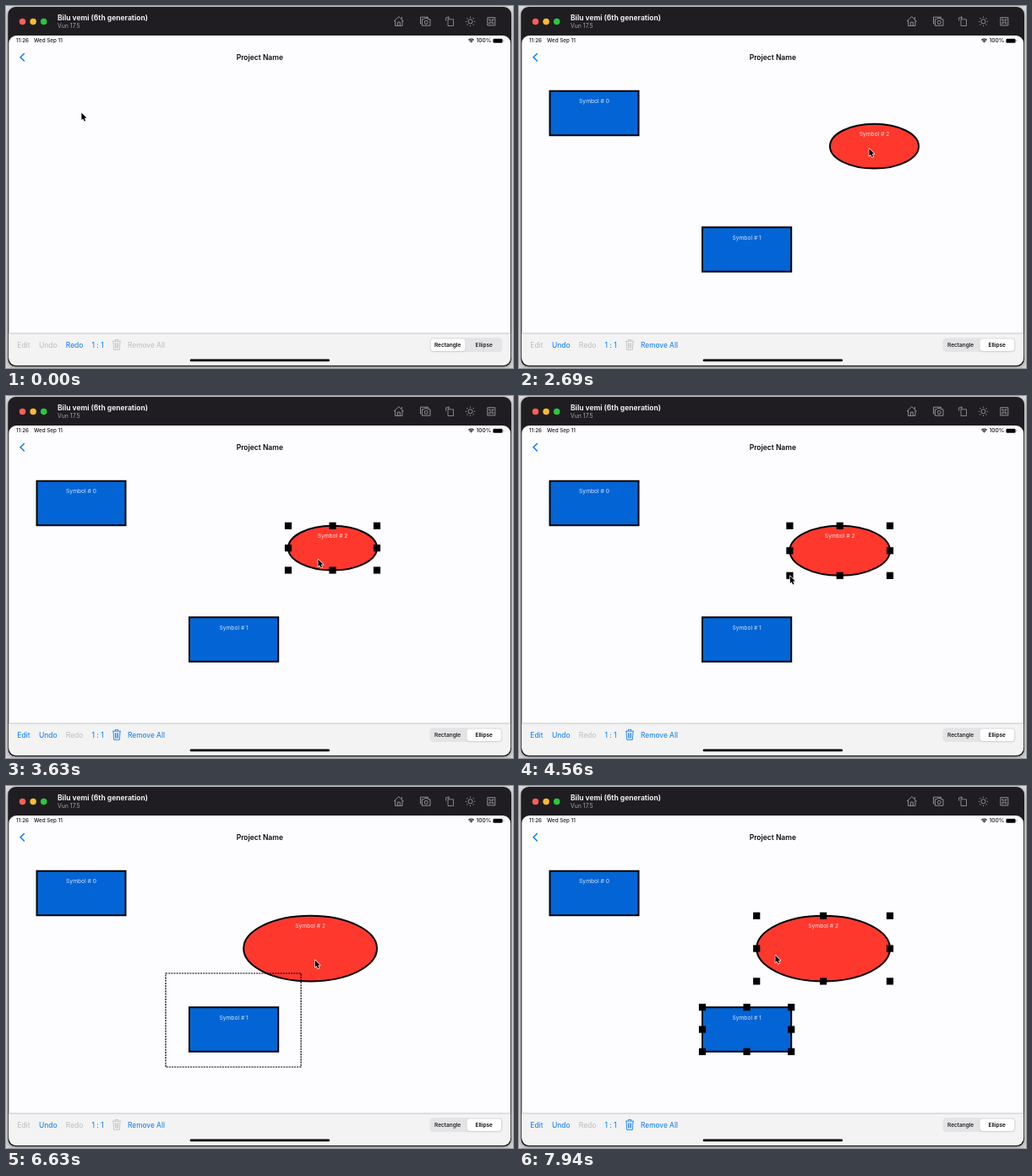
An HTML page with a canvas that plays this animation: 600 px wide and 429 px high, repeating every 8000 ms.

```html
<!DOCTYPE html>
<html lang="en">
<head>
<meta charset="utf-8">
<title>Symbol editor</title>
<style>
  html, body { margin: 0; width: 100%; height: 100%; overflow: hidden; background: #e2e2e4; }
  canvas { display: block; width: 600px; height: 429px; }
</style>
</head>
<body>
<canvas id="stage"></canvas>
<script>
const W = 600, H = 429, LOOP = 8000;
const BLUE = '#047af4', OFF = '#bdbdc0', ICON = '#9d9ca0', PAGE = '#fdfcfe';
const canvas = document.getElementById('stage');
const ctx = canvas.getContext('2d');
const ratio = window.devicePixelRatio || 1;
canvas.width = W * ratio;
canvas.height = H * ratio;

// Moments at which the editor changes state
const AT = {
  first: 120, second: 560, press: 1060, toggle: 1440, third: 2400, select: 2900,
  drag: 3080, resize: 4350, deselect: 5900, marquee: 6041, release: 7390
};

// Pointer stops: time, x, y
const POINTER = [
  [0, 89, 126], [180, 89, 126], [540, 269, 288], [600, 269, 288], [1100, 566, 402],
  [1720, 566, 402], [2350, 420, 165], [2440, 420, 165], [2680, 414, 168.5],
  [2760, 414, 168.5], [2980, 403, 179], [AT.drag, 403, 179], [3560, 369, 193],
  [3680, 369, 193], [4200, 334, 206.5], [AT.resize, 334, 206.5], [5000, 277, 233],
  [5080, 277, 233], [5250, 281.2, 231.4], [5350, 281.2, 231.4], [5850, 189, 333],
  [6000, 189, 333], [7073, 466, 133], [7400, 466, 133], [7920, 303, 200]
];
const MARQUEE = [[AT.marquee, 189, 333], [7114, 466, 141]];

const ease = u => (1 - Math.cos(Math.PI * u)) / 2;
const clamp = u => Math.max(0, Math.min(1, u));

function follow(stops, t) {
  let i = 1;
  while (i < stops.length - 1 && stops[i][0] < t) i++;
  const a = stops[i - 1], b = stops[i];
  const k = ease(clamp((t - a[0]) / (b[0] - a[0])));
  return [a[1] + (b[1] - a[1]) * k, a[2] + (b[2] - a[2]) * k];
}

function box(x, y, w, h, r, fill) {
  ctx.beginPath();
  ctx.roundRect(x, y, w, h, r);
  ctx.fillStyle = fill;
  ctx.fill();
}

function shadowed(color, blur, dy, paint) {
  ctx.save();
  ctx.shadowColor = color;
  ctx.shadowBlur = blur * ratio;
  ctx.shadowOffsetY = dy * ratio;
  paint();
  ctx.restore();
}

function text(str, x, y, size, color, weight = 400, align = 'left') {
  ctx.font = `${weight} ${size}px Inter, sans-serif`;
  ctx.textAlign = align;
  ctx.fillStyle = color;
  ctx.fillText(str, x, y);
}

function line(d, color, width = 0.9) {
  ctx.strokeStyle = color;
  ctx.lineWidth = width;
  ctx.stroke(new Path2D(d));
}

function disc(x, y, r, fill) {
  ctx.beginPath();
  ctx.arc(x, y, r, 0, 7);
  ctx.fillStyle = fill;
  ctx.fill();
}

function ring(x, y, r) {
  ctx.beginPath();
  ctx.arc(x, y, r, 0, 7);
  ctx.strokeStyle = ICON;
  ctx.lineWidth = 0.9;
  ctx.stroke();
}

function titleBar() {
  shadowed('rgba(0,0,0,.4)', 8, 2, () => box(2.3, 1, 595.7, 426.3, 9, '#1f1d21'));
  ['#fe5f57', '#febc2e', '#28c840'].forEach((c, i) => disc(19.5 + i * 12.6, 18.4, 3.75, c));
  text('Bilu vemi (6th generation)', 61, 17.3, 8.5, '#efeef0', 700);
  text('Vun 17.5', 61, 26, 6.9, '#a3a2a6');

  // Home
  line('M459 18.2 L464.8 12.6 L470.6 18.2 M460.6 17 V23.4 H469 V17 M463.3 23.4 V19.2 H466.3 V23.4 M468.4 13 V15.5', ICON);
  // Stacked cameras
  line('M491.5 21 H490.5 V13.2 H499.5 V14.8 M492.4 15.8 H494.6 L495.6 14.6 H498.6 L499.6 15.8 H502 V23.2 H492.4 Z', ICON);
  ring(497.2, 19.3, 2);
  // Rotate
  line('M523 15.8 H529.5 V23.5 H523 Z M520.6 17.6 V13.8 H524.6 M523 12.2 L524.6 13.8 L523 15.4', ICON, 0.8);
  // Brightness
  ring(549.5, 18.3, 2.6);
  for (let i = 0; i < 8; i++) {
    const a = i * Math.PI / 4;
    disc(549.5 + 5.1 * Math.cos(a), 18.3 + 5.1 * Math.sin(a), 0.65, ICON);
  }
  // Shortcut key
  line('M569.8 13.7 H578.8 V23 H569.8 Z', ICON);
  line('M573 17 H575.6 V19.7 H573 Z M573 17 H571.6 V15.6 H573 Z M575.6 17 V15.6 H577 V17 Z M575.6 19.7 H577 V21.1 H575.6 Z M573 19.7 V21.1 H571.6 V19.7 Z', ICON, 0.6);
}

function screenPath() {
  ctx.beginPath();
  ctx.roundRect(3.3, 35, 593.8, 390.8, 9);
}

function screen() {
  screenPath();
  ctx.fillStyle = PAGE;
  ctx.fill();
  text('11:26', 12, 43.4, 6.3, '#1a1a1a', 500);
  text('Wed Sep 11', 33, 43.4, 6.3, '#1a1a1a', 500);
  for (let i = 0; i < 3; i++) {
    ctx.beginPath();
    ctx.arc(550.5, 43.6, 0.9 + i * 1.8, -Math.PI * 0.75, -Math.PI * 0.25);
    ctx.strokeStyle = '#111';
    ctx.lineWidth = 1.2;
    ctx.stroke();
  }
  text('100%', 556.5, 43.4, 6.6, '#1a1a1a', 500);
  box(576, 38.5, 12, 5.5, 1.7, '#9a9a9c');
  box(576.7, 39.1, 10.6, 4.3, 1.2, '#000');
  box(588.5, 40.2, 0.9, 2.1, 0.4, '#9a9a9c');
  ctx.lineCap = ctx.lineJoin = 'round';
  line('M21.4 56.5 L17 60.8 L21.4 65.1', BLUE, 1.4);
  ctx.lineCap = 'butt';
  ctx.lineJoin = 'miter';
  text('Project Name', 300.3, 63.8, 8.5, '#0a0a0a', 600, 'center');
}

function trash(color) {
  line('M126 397.2 H136 M129.3 397 V395.4 H132.7 V397 M127 397.4 L127.7 407.4 H134.3 L135 397.4 M129.3 399.2 L129.6 405.6 M131 399.2 V405.6 M132.7 399.2 L132.4 405.6', color, 0.85);
}

function toolbar(t, selected) {
  ctx.save();
  screenPath();
  ctx.clip();
  box(3, 388, 595, 38, 0, '#f3f3f4');
  box(3, 387.6, 595, 0.8, 0, '#c6c6c9');
  ctx.restore();

  const edited = t >= AT.first;
  const hue = on => on ? BLUE : OFF;
  text('Edit', 13.3, 404.7, 8.5, hue(selected));
  text('Undo', 39, 404.7, 8.5, hue(edited));
  text('Redo', 70.8, 404.7, 8.5, hue(!edited));
  text('1 : 1', 101.5, 404.7, 8.5, BLUE);
  trash(hue(selected));
  text('Remove All', 144, 404.7, 8.4, hue(edited));

  const slide = ease(clamp((t - AT.toggle) / 240));
  const pressed = t >= AT.press && t < AT.toggle;
  box(501.5, 393.3, 86, 16.7, 4.3, '#e4e4e6');
  shadowed('rgba(0,0,0,.16)', 2, 0.7, () => box(502.6 + 42.8 * slide, 394.4, 40.8, 14.5, 3.6, '#fff'));
  text('Rectangle', 522.6, 404, 6.5, '#0c0c0c', slide < 0.5 ? 600 : 500, 'center');
  text('Ellipse', 565.7, 404, 6.5, pressed ? '#77777a' : '#0c0c0c', slide < 0.5 ? 500 : 600, 'center');
  box(217.7, 418.6, 165.3, 2.6, 1.3, '#000');
}

function symbol(id, left, top, right, bottom, round) {
  const cx = (left + right) / 2, w = right - left, h = bottom - top;
  ctx.beginPath();
  if (round) ctx.ellipse(cx, top + h / 2, w / 2, h / 2, 0, 0, 7);
  else ctx.rect(left, top, w, h);
  ctx.fillStyle = round ? '#ff382e' : '#0365d5';
  ctx.fill();
  ctx.strokeStyle = '#050505';
  ctx.lineWidth = 2;
  ctx.stroke();
  text('Symbol # ' + id, cx, top + 14.3, 6.7, round ? '#ffe0dd' : '#d5e5f8', 400, 'center');
}

function handles(left, top, right, bottom) {
  const xs = [left, (left + right) / 2, right], ys = [top, (top + bottom) / 2, bottom];
  xs.forEach((x, i) => ys.forEach((y, j) => {
    if (i !== 1 || j !== 1) box(x - 4.1, y - 4.1, 8.2, 8.2, 0, '#000');
  }));
}

function ellipseBounds(t) {
  const [dx, dy] = follow(POINTER, Math.min(Math.max(t, AT.drag), 3560));
  const [rx, ry] = follow(POINTER, Math.min(Math.max(t, AT.resize), 5250));
  const mx = dx - 403, my = dy - 179;
  return [368 + mx + rx - 334, 139.8 + my, 473 + mx, 192.5 + my + ry - 206.5];
}

function selectionRect(t) {
  const [x, y] = follow(MARQUEE, t);
  ctx.setLineDash([2.1, 1.05]);
  ctx.strokeStyle = '#000';
  ctx.lineWidth = 1.2;
  ctx.strokeRect(189, y, x - 189, 333 - y);
  ctx.setLineDash([]);
}

function pointer(t) {
  const [x, y] = follow(POINTER, t);
  ctx.save();
  ctx.translate(x + 0.4, y + 0.5);
  const arrow = new Path2D('M0 0 V8.6 L1.9 6.9 L3.3 10.1 L4.7 9.5 L3.4 6.3 H6 Z');
  ctx.lineJoin = 'round';
  ctx.strokeStyle = '#fff';
  ctx.lineWidth = 1.3;
  ctx.stroke(arrow);
  ctx.fillStyle = '#000';
  ctx.fill(arrow);
  ctx.restore();
}

function draw(t) {
  const both = t >= AT.release;
  const selected = both || (t >= AT.select && t < AT.deselect);
  ctx.setTransform(ratio, 0, 0, ratio, 0, 0);
  box(0, 0, W, H, 0, '#e2e2e4');
  titleBar();
  screen();
  toolbar(t, selected);

  const second = [217, 262.2, 322.2, 314.8];
  const oval = ellipseBounds(t);
  if (t >= AT.first) symbol(0, 36.5, 100.7, 141.5, 153.3);
  if (t >= AT.second) symbol(1, ...second);
  if (t >= AT.third) symbol(2, ...oval, true);
  if (selected) handles(...oval);
  if (both) handles(...second);
  if (t >= AT.marquee && !both) selectionRect(t);
  pointer(t);
}

const start = performance.now();
function tick() {
  draw((performance.now() - start) % LOOP);
  requestAnimationFrame(tick);
}
tick();
</script>
</body>
</html>
```
